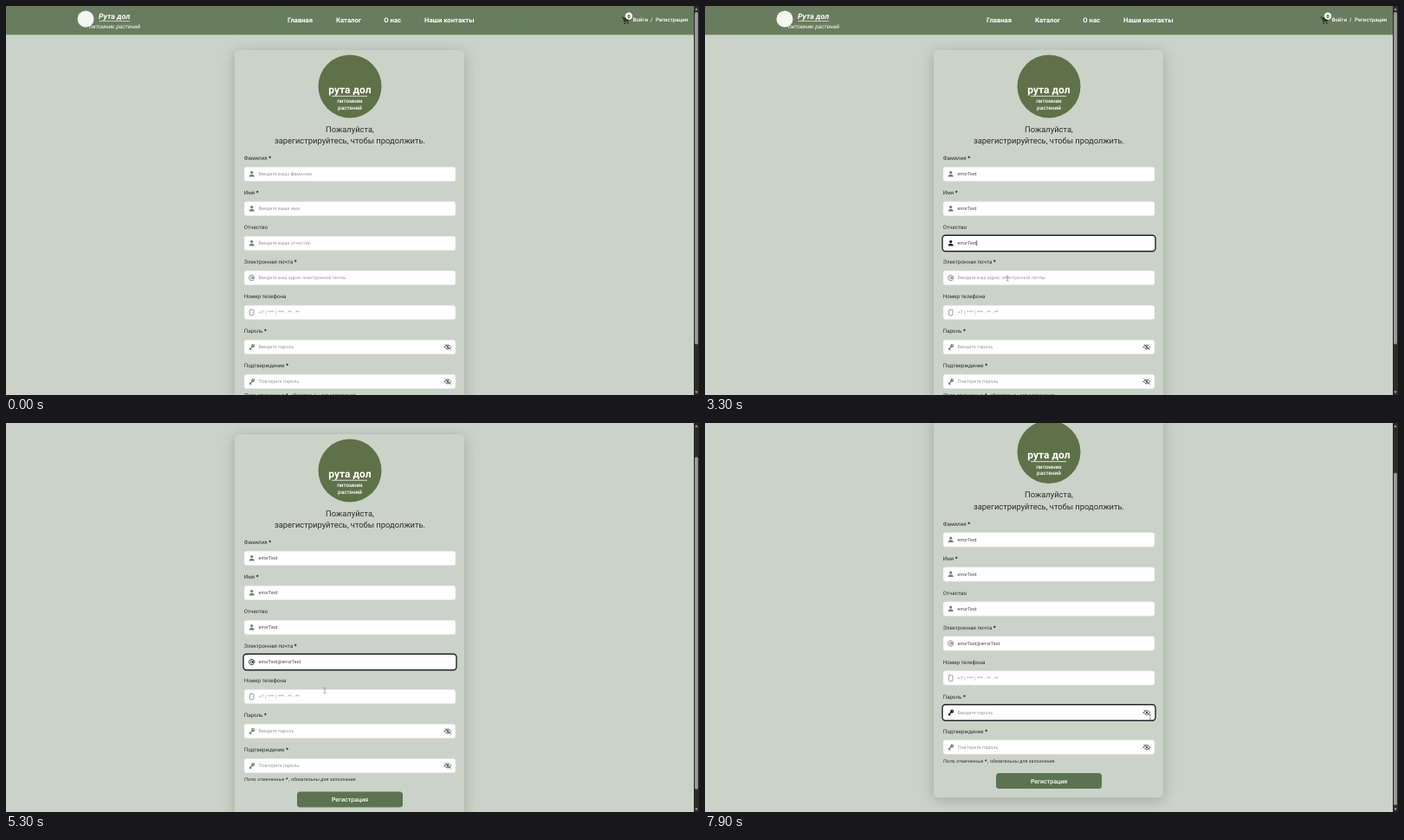
Animation of 800x450 px, one loop 8000 ms. Source, as an HTML page:

```html
<!DOCTYPE html>
<html lang="ru">
<head>
<meta charset="utf-8">
<title>Регистрация</title>
<style>
html, body { margin: 0; width: 100%; height: 100%; overflow: hidden; background: #cbd2c7; }
svg { display: block; width: 800px; height: 450px; }
text { font-family: Roboto, "Noto Sans", sans-serif; text-rendering: geometricPrecision; white-space: pre; }
.mid { text-anchor: middle; }
.nav { font-size: 7.7px; font-weight: 600; fill: #fff; }
.user { font-size: 6.2px; font-weight: 500; fill: #fff; }
.label { font-size: 6.2px; fill: #2d312b; }
.input { font-size: 5.45px; }
.line { fill: none; stroke: currentColor; stroke-linecap: round; stroke-linejoin: round; }
</style>
</head>
<body>
<svg viewBox="0 0 800 450">
  <defs>
    <pattern id="weave" width="4" height="4" patternUnits="userSpaceOnUse">
      <path d="M0 1l1.5 1M2 3l1.5 1" stroke="#53674a" stroke-width=".6" opacity=".45"/>
    </pattern>
    <filter id="shadow" x="-20%" y="-20%" width="140%" height="140%">
      <feGaussianBlur stdDeviation="8"/>
    </filter>
    <g id="person">
      <circle cx="283.7" cy="192.6" r="1.6" fill="currentColor"/>
      <path d="M280.7 197.4c0-3.4 6-3.4 6 0z" fill="currentColor"/>
    </g>
    <g id="at" class="line" stroke-width=".8">
      <circle cx="283.7" cy="194.5" r="1.3"/>
      <path d="M285 193v2c0 1.3 1.9 1.2 1.9-.5a3.2 3.2 0 1 0-1.4 2.7"/>
    </g>
    <rect id="mobile" class="line" x="281.5" y="191.3" width="4.4" height="6.6" rx=".9" stroke-width=".7"/>
    <g id="key">
      <circle cx="285.2" cy="193" r="1.9" fill="currentColor"/>
      <path class="line" d="M284.3 194l-3 3M281.8 196.6l1 .9" stroke-width="1.3"/>
      <circle cx="285.6" cy="192.6" r=".55" fill="#fff"/>
    </g>
    <g id="eye" color="#555">
      <path class="line" d="M506.2 194.5q3.8-5.2 7.6 0q-3.8 5.2-7.6 0z" stroke-width=".9"/>
      <circle cx="510" cy="194.5" r="1.3" fill="currentColor"/>
      <path class="line" d="M506.8 191.5l6.6 6" stroke-width=".9"/>
    </g>
  </defs>

  <rect width="800" height="450" fill="#cbd2c7"/>
  <g id="page">
    <rect width="794" height="33.3" fill="#697e5e"/>
    <rect width="794" height="33.3" fill="url(#weave)"/>
    <circle cx="92" cy="15" r="9.5" fill="#f4f6f2"/>
    <g fill="#fff" font-style="italic">
      <text x="107" y="14.5" font-size="8.9" font-weight="600">Рута дол</text>
      <rect x="107" y="17" width="36" height=".6"/>
      <text x="96" y="25.7" font-size="6.6">питомник растений</text>
    </g>
    <g class="nav">
      <text x="325" y="19.2">Главная</text>
      <text x="381" y="19.2">Каталог</text>
      <text x="436.3" y="19.2">О нас</text>
      <text x="483" y="19.2">Наши контакты</text>
    </g>
    <g color="#2c3528">
      <path class="line" d="M711 13h1.4l1.2 5h4.6l.9-4h-6.2" stroke-width="1"/>
      <path d="M713 14h6.2l-1 3.6h-4.4z" fill="currentColor"/>
      <circle cx="714.2" cy="20" r=".9" fill="currentColor"/>
      <circle cx="717.8" cy="20" r=".9" fill="currentColor"/>
    </g>
    <circle cx="719" cy="11.6" r="4.2" fill="#fff"/>
    <text class="mid" x="719" y="13.6" font-size="5.6" font-weight="700" fill="#222">0</text>
    <g class="user">
      <text x="723.4" y="18.4">Войти</text>
      <text x="744" y="18.4">/</text>
      <text x="750" y="18.4">Регистрация</text>
    </g>

    <rect x="264" y="54" width="265" height="441" rx="5" fill="#6f7d70" opacity=".5" filter="url(#shadow)"/>
    <rect x="264" y="51" width="265" height="441.7" rx="5" fill="#cbd2c7"/>
    <circle cx="397" cy="93" r="36.5" fill="#5f7148"/>
    <g class="mid" fill="#fff">
      <text x="397" y="100.6" font-size="12" font-weight="600">рута дол</text>
      <rect x="376" y="103.8" width="41" height=".8"/>
      <text x="397" y="112.4" font-size="6.4" font-weight="500">питомник</text>
      <text x="397" y="119.6" font-size="6.4" font-weight="500">растений</text>
    </g>
    <g class="mid" font-size="9.4" fill="#2b2f2a">
      <text x="397" y="145.8">Пожалуйста,</text>
      <text x="397" y="159.2">зарегистрируйтесь, чтобы продолжить.</text>
    </g>
    <g id="fields"></g>
    <text x="275" y="452" font-size="5.5" font-style="italic" fill="#33382f">Поля, отмеченные <tspan font-weight="700" fill="#000">*</tspan> , обязательны для заполнения.</text>
    <rect x="336" y="464.6" width="122" height="18" rx="3.5" fill="#5b7350"/>
    <text class="mid" x="397" y="476" font-size="7" font-weight="500" fill="#fff">Регистрация</text>
    <rect id="caret" width=".6" height="6.4" fill="#222"/>
  </g>

  <rect x="794" width="6" height="450" fill="#2b2b2b"/>
  <rect id="thumb" x="795.1" y="7" width="3.8" height="384.5" rx="1.9" fill="#9c9c9c"/>
  <path d="M795.3 4.8l1.7-2.6 1.7 2.6zM795.3 445.6l1.7 2.6 1.7-2.6z" fill="#a8a8a8"/>
  <path id="arrow" d="M0 0v5l1.2-1 .8 1.9 .9-.4-.8-1.8h1.6z" fill="#111" stroke="#fff" stroke-width=".3"/>
  <path id="beam" class="line" d="M-1.2-3q1.2 0 1.2 .7v4.6q0 .7-1.2 .7M1.2-3q-1.2 0-1.2 .7M1.2 3q-1.2 0-1.2-.7" color="#777" stroke-width=".6"/>
</svg>
<script>
const $ = id => document.getElementById(id);
const LOOP = 8000, STEP = 100, MAX_SCROLL = 59.5, PITCH = 40, TEXT_X = 291.6;
const WORD = 'errorTest';

// label, required, icon, placeholder
const specs = [
  ['Фамилия', 1, 'person', 'Введите вашу фамилию'],
  ['Имя', 1, 'person', 'Введите ваше имя'],
  ['Отчество', 0, 'person', 'Введите ваше отчество'],
  ['Электронная почта', 1, 'at', 'Введите ваш адрес электронной почты'],
  ['Номер телефона', 0, 'mobile', '+7 ( *** ) *** - ** - **'],
  ['Пароль', 1, 'key', 'Введите пароль'],
  ['Подтверждение', 1, 'key', 'Повторите пароль']
];

$('fields').innerHTML = specs.map(([label, required, icon], i) => `
  <g transform="translate(0 ${i * PITCH})">
    <text class="label" x="274.8" y="178">${label}${required ? ' <tspan font-weight="700" fill="#000">*</tspan>' : ''}</text>
    <rect class="box"/>
    <use class="icon" href="#${icon}"/>
    <text class="input" x="${TEXT_X}" y="196.4"></text>
    ${icon === 'key' ? '<use href="#eye"/>' : ''}
  </g>`).join('');

const fields = [...$('fields').children].map(g => ({
  box: g.querySelector('.box'), icon: g.querySelector('.icon'), text: g.querySelector('.input')
}));

// time, focused field, its value
const edits = [
  [500, 0, ''],
  ...[...WORD].map((_, i) => [700 + i * STEP, 0, WORD.slice(0, i + 1)]),
  [1800, 1, ''], [2200, 1, WORD],
  [2600, 2, ''], [2900, 2, WORD],
  [3500, 3, ''], [3800, 3, WORD], [4200, 3, WORD + '@'], [4800, 3, WORD + '@' + WORD],
  [6200, 5, '']
];

const scrollKeys = [[5100, 0], [5200, 1.2], [5300, 38], [5400, MAX_SCROLL]];
const mouseKeys = [
  [100, 352, 250], [450, 384, 196], [1500, 384, 196], [1750, 387, 236], [2000, 388, 244],
  [2300, 388, 246], [2600, 372, 276], [2900, 368, 280], [3300, 349, 315], [3500, 352, 314],
  [4300, 362, 310], [5200, 368, 309], [5400, 368, 310], [5800, 368, 313],
  [6200, 370, 336], [7200, 372, 336], [7600, 528, 344], [7900, 514, 340]
];

function sample(keys, t) {
  const n = keys.findIndex(k => k[0] > t);
  if (n < 1) return (n ? keys[keys.length - 1] : keys[0]).slice(1);
  const a = keys[n - 1], b = keys[n], p = (t - a[0]) / (b[0] - a[0]);
  return a.slice(1).map((v, i) => v + (b[i + 1] - v) * p);
}

function set(el, attrs) {
  for (const name in attrs) el.setAttribute(name, attrs[name]);
}

function drawField(field, i, value, focused) {
  const grow = focused ? 1 : 0;
  set(field.box, {
    x: 275 - grow, y: 186.3 - grow, width: 244 + 2 * grow, height: 16.4 + 2 * grow,
    rx: 2.6 + grow, fill: '#fff',
    stroke: focused ? '#20242b' : '#dfe3e0', 'stroke-width': focused ? 1.4 : .6
  });
  set(field.icon, { color: focused ? '#111' : '#777' });
  set(field.text, { fill: value ? '#444' : '#9a9a9a' });
  field.text.textContent = value || specs[i][3];
}

function draw(t) {
  const [scroll] = sample(scrollKeys, t);
  set($('page'), { transform: `translate(0 ${-scroll})` });
  set($('thumb'), { y: 7 + scroll * .85 });

  const values = specs.map(() => '');
  let since = 0, active = -1;
  for (const [time, field, value] of edits) {
    if (time > t) break;
    values[field] = value;
    active = field;
    since = time;
  }
  fields.forEach((f, i) => drawField(f, i, values[i], i === active));

  const caretOn = active >= 0 && (t - since) % 1000 < 500;
  set($('caret'), { visibility: caretOn ? 'visible' : 'hidden' });
  if (caretOn) {
    const width = values[active] ? fields[active].text.getComputedTextLength() : 0;
    set($('caret'), { x: TEXT_X + width, y: 191.2 + active * PITCH });
  }

  const [x, y] = sample(mouseKeys, t);
  const offset = y + scroll - 186;
  const overInput = offset >= 0 && offset % PITCH <= 17;
  const transform = `translate(${x} ${y})`;
  set($('beam'), { transform, visibility: t >= 100 && overInput ? 'visible' : 'hidden' });
  set($('arrow'), { transform, visibility: t >= 100 && !overInput ? 'visible' : 'hidden' });
}

const start = performance.now();
function tick() {
  const t = (performance.now() - start) % LOOP;
  draw(Math.floor(t / STEP) * STEP);
  requestAnimationFrame(tick);
}
tick();
</script>
</body>
</html>
```
